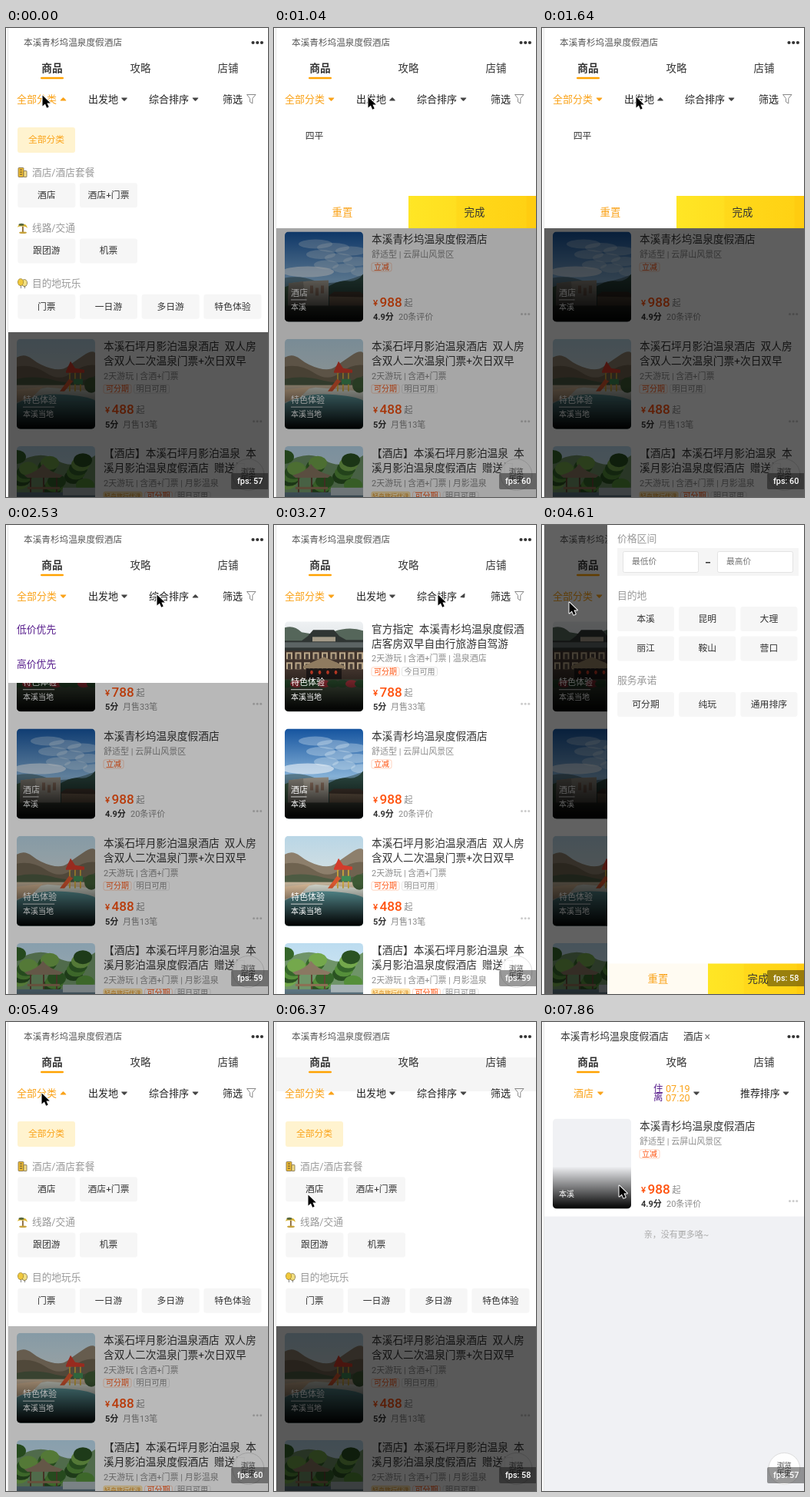
These frames come from a looping animation (341x609 px, 8000 ms). An HTML page with a canvas:

```html
<!DOCTYPE html>
<html lang="zh">
<head>
<meta charset="utf-8">
<title>酒店列表筛选</title>
<style>
  html, body { margin: 0; width: 100%; height: 100%; overflow: hidden; background: #fff; }
  canvas { display: block; width: 341px; height: 609px; }
</style>
</head>
<body>
<canvas id="stage"></canvas>
<script>
const W = 341, H = 609, LOOP = 8000, TICK = 148.3;
const FONT = 'Roboto, "Noto Sans CJK SC", "Noto Sans CJK", sans-serif';
const ORANGE = '#faa31a', PRICE = '#ff5310', PURPLE = '#551a8b', PALE = '#f0f1f4';
const HOTEL = '本溪青杉坞温泉度假酒店';

const canvas = document.getElementById('stage');
const ctx = canvas.getContext('2d');
const dpr = window.devicePixelRatio || 1;
canvas.width = Math.round(W * dpr);
canvas.height = Math.round(H * dpr);

// ---- helpers ----
function rect(x, y, w, h, color) {
  ctx.fillStyle = color;
  ctx.fillRect(x, y, w, h);
}

function round(x, y, w, h, r, fill, stroke) {
  ctx.beginPath();
  ctx.roundRect(x, y, w, h, r);
  if (fill) { ctx.fillStyle = fill; ctx.fill(); }
  if (stroke) { ctx.strokeStyle = stroke; ctx.lineWidth = 0.8; ctx.stroke(); }
}

function shape(color, d) {
  ctx.fillStyle = color;
  ctx.fill(new Path2D(d));
}

function oval(color, x, y, rx, ry = rx) {
  ctx.beginPath();
  ctx.ellipse(x, y, rx, ry, 0, 0, 7);
  ctx.fillStyle = color;
  ctx.fill();
}

// cy is the visual middle of the line
function text(s, x, cy, size, color, weight = 400, align = 'left') {
  ctx.font = `${weight} ${size}px ${FONT}`;
  ctx.textAlign = align;
  ctx.textBaseline = 'alphabetic';
  ctx.fillStyle = color;
  ctx.fillText(s, x, cy + size * 0.325);
}

const label = (s, x, cy, size, color, weight) => text(s, x, cy, size, color, weight, 'center');

function dots(x, y, gap, r, color) {
  for (let i = 0; i < 3; i++) oval(color, x + i * gap, y, r);
}

function arrow(x, y, angle, color) {
  ctx.save();
  ctx.translate(x, y);
  ctx.rotate(angle);
  shape(color, 'M-3.6 -2H3.6Q4.1 -1.7 3.5 -1.1L.7 1.9Q0 2.5 -.7 1.9L-3.5 -1.1Q-4.1 -1.7 -3.6 -2Z');
  ctx.restore();
}

function button(s, x, y, h = 32, w = 75, fill = '#f6f6f6', color = '#333') {
  round(x, y, w, h, 3, fill);
  label(s, x + w / 2, y + h / 2, 11.8, color);
}

function yellow(x, y, h) {
  const g = ctx.createLinearGradient(x, 0, W, 0);
  g.addColorStop(0, '#ffe625');
  g.addColorStop(0.37, '#ffdf20');
  g.addColorStop(0.38, '#ffd91b');
  g.addColorStop(0.92, '#ffd214');
  g.addColorStop(0.93, '#ffcc10');
  rect(x, y, W - x, h, g);
}

// ---- pictures, each 102 x 117 ----
function sky(top, bottom) {
  const g = ctx.createLinearGradient(0, 0, 0, 75);
  g.addColorStop(0, top);
  g.addColorStop(1, bottom);
  rect(0, 0, 102, 117, g);
}

function lodge() {
  sky('#eef1f3', '#c9d0d2');
  shape('#55665a', 'M0 8Q12 4 22 14L40 17L64 13Q84 6 102 12V50H0Z');
  shape('#2f3533', 'M30 19L37 11H64L71 19L80 24H102V40H0V25H22Z');
  shape('#5c6464', 'M0 27H102V34H0Z');
  rect(36, 20, 30, 6, '#a39a88');
  rect(0, 38, 102, 42, '#40332c');
  for (let y = 0; y < 2; y++) {
    for (let x = 0; x < 9; x++) {
      rect(2 + x * 11.5, 40 + y * 13, 8, 9, '#b9a688');
      rect(4 + x * 11.5, 42 + y * 13, 4, 7, '#4a3f38');
    }
  }
  shape('#8f7b60', 'M24 58L51 46L78 58V61H24Z');
  rect(28, 61, 46, 19, '#1d1817');
  for (let x = 0; x < 4; x++) oval('#c23a26', 35 + x * 10.5, 66, 1.8, 2.6);
  rect(0, 75, 102, 42, '#3f4a3a');
  for (let x = 0; x < 9; x++) oval(x % 3 === 1 ? '#9c3038' : '#28492b', 3 + x * 12, 81, 8, 5);
}

function stone() {
  sky('#15549f', '#9cc4e2');
  for (let i = 0; i < 9; i++) {
    oval('rgba(228,238,246,.32)', 40 + (i * 23) % 62, 16 + i * 4.5, 22 - i, 6);
  }
  oval('rgba(238,244,249,.6)', 30, 52, 34, 7);
  shape('#56788a', 'M0 60Q20 56 40 64T102 56V90H0Z');
  shape('#27413a', 'M52 74Q70 62 82 64T102 55V100H40Z');
  shape('#35503b', 'M0 72Q10 66 22 74V98H0Z');
  rect(58, 83, 44, 14, '#6b5a49');
  shape('#3d3129', 'M56 84L64 78H98L102 81V85Z');
  shape('#8f8a80', 'M5 67L30 64L57 63V98H4Z');
  shape('#76726a', 'M5 67L24 64.6L27 98H4Z');
  for (let i = 0; i < 3; i++) rect(33 + i * 7, 70 + (i % 2) * 3, 4, 10, '#7a6354');
  rect(0, 96, 102, 21, '#3a4036');
}

function pool() {
  sky('#b9d6e6', '#dfe3df');
  shape('#8d7f6c', 'M0 24Q10 18 20 26T44 38T66 36T86 22T102 18V70H0Z');
  shape('#6f6350', 'M0 36Q20 32 38 44T72 44T102 34V64H0Z');
  shape('#4d5b43', 'M0 52Q24 47 50 54T102 48V64H0Z');
  rect(0, 60, 102, 57, '#bfae96');
  shape('#cfd3c9', 'M0 70L40 63L102 68V90H0Z');
  shape('#5f9b9f', 'M0 84Q24 70 58 72T102 80V117H0Z');
  shape('#d2b594', 'M0 66L34 62L20 76L0 82Z');
  for (let i = 0; i < 3; i++) rect(68 + i * 7, 40, 1.8, 28, '#c9a33a');
  shape('#d23c2b', 'M64 42L70 29L76 38L88 40V44H64Z');
  shape('#d8562f', 'M68 52L56 68H62L73 55Z');
  rect(74, 52, 12, 7, '#3f8b55');
  oval('#3e5a35', 97, 60, 9, 10);
}

function garden() {
  sky('#bcdcf0', '#dcebf2');
  shape('#6f9468', 'M0 22Q30 4 52 18T102 12V60H0Z');
  for (let i = 0; i < 18; i++) {
    const x = (i * 37) % 108;
    const y = 14 + (i * 11) % 38 - Math.abs(x - 50) * 0.16;
    oval(['#35662a', '#558f3a', '#2a5222', '#74a84c'][i % 4], x, y + 8, 12, 9);
  }
  shape('#8a7862', 'M10 38Q28 33 34 23Q41 33 60 38L56 41H14Z');
  for (let i = 0; i < 3; i++) rect(17 + i * 17, 41, 2, 22, '#5f4634');
  rect(14, 53, 42, 3, '#8d7054');
  rect(0, 60, 102, 57, '#5c7480');
  rect(60, 54, 42, 10, '#a9b4b8');
}

// ---- hotel cards ----
const items = [
  { pic: lodge, title: ['官方指定 本溪青杉坞温泉度假酒', '店客房双早自由行旅游自驾游'],
    info: '2天游玩 | 含酒+门票 | 温泉酒店', tags: ['可分期', '今日可用'],
    price: '788', score: '5分', note: '月售33笔', kind: '特色体验', place: '本溪当地' },
  { pic: stone, title: [HOTEL], info: '舒适型 | 云屏山风景区', tags: ['立减'],
    price: '988', score: '4.9分', note: '20条评价', kind: '酒店', place: '本溪' },
  { pic: pool, title: ['本溪石坪月影泊温泉酒店 双人房', '含双人二次温泉门票+次日双早'],
    info: '2天游玩 | 含酒+门票', tags: ['可分期', '明日可用'],
    price: '488', score: '5分', note: '月售13笔', kind: '特色体验', place: '本溪当地' },
  { pic: garden, title: ['【酒店】本溪石坪月影泊温泉 本', '溪月影泊温泉度假酒店 赠送门'],
    info: '2天游玩 | 含酒+门票 | 月影温泉', tags: ['轻舟旅行优选', '可分期', '明日可用'],
    price: '588', score: '5分', note: '月售9笔', kind: '特色体验', place: '本溪当地' }
];
const result = { ...items[1], pic: null, kind: '' };

function thumb(it, y) {
  ctx.save();
  ctx.beginPath();
  ctx.roundRect(14, y, 102, 117, 5);
  ctx.clip();
  ctx.translate(14, y);
  if (it.pic) it.pic(); else rect(0, 0, 102, 117, PALE);
  const g = ctx.createLinearGradient(0, 62, 0, 117);
  g.addColorStop(0, 'rgba(0,0,0,0)');
  g.addColorStop(1, '#000');
  rect(0, 62, 102, 55, g);
  ctx.restore();
  if (it.kind) {
    text(it.kind, 22, y + 79.5, 11, '#fff');
    rect(22, y + 88, it.kind.length * 10.3, 0.9, '#ddd');
  }
  text(it.place, 22, y + 98, 10, '#fff');
}

function tagRow(tags, y) {
  let x = 127;
  for (const s of tags) {
    const special = s.length > 4, gray = s.length === 4;
    const size = special ? 8 : 10;
    const w = s.length * size + (special ? 2 : 6);
    const color = gray ? '#888' : special ? '#d98a16' : PRICE;
    round(x, y - 5.5, w, 11, 2, special ? '#ffe9b8' : null, gray ? '#ddd' : special ? '#ffd98a' : '#ffc9b0');
    label(s, x + w / 2, y + 0.3, size, color);
    x += w + 3.5;
  }
}

function card(it, y) {
  thumb(it, y);
  // an en space matches the wide gap between title parts
  it.title.forEach((s, i) => text(s.replace(' ', '\u2002'), 127, y + 9.8 + i * 19, 13.7, '#333'));
  const dy = y + it.title.length * 19;
  text(it.info, 127, dy + 10.5, 11, '#8c8c8c');
  tagRow(it.tags, dy + 27);
  text('¥', 129, y + 92.8, 11.5, PRICE, 500);
  text(it.price, 137.5, y + 92, 17.2, PRICE, 500);
  text('起', 169.5, y + 92.8, 11, '#888');
  text(it.score, 129, y + 111.3, 11, '#333', 700);
  text(it.note, it.score.length > 2 ? 162 : 152, y + 111.3, 11, '#8c8c8c');
  dots(322.5, y + 107, 4.6, 1.5, '#ccc');
}

// ---- header and filters ----
function tabs() {
  dots(321.5, 19, 5.7, 2.1, '#333');
  label('商品', 60, 53, 13.7, '#333', 700);
  label('攻略', 175, 53, 13.4, '#333');
  label('店铺', 289, 53, 13.4, '#333');
  round(45, 63.7, 30, 2.6, 1.3, '#ffa200');
}

function header(turn, band) {
  rect(3, 0, W, 108, '#fff');
  if (band) rect(3, 46, W, 44, '#f5f5f5');
  text(HOTEL, 23, 19, 11.65, '#555');
  tabs();
  text('全部分类', 14, 92.8, 13, ORANGE);
  text('出发地', 107, 92.8, 13, '#222');
  text('综合排序', 186, 92.8, 13, '#222');
  text('筛选', 282, 92.8, 13, '#222');
  [[74.5, ORANGE], [154, '#444'], [246.5, '#444']].forEach(([x, c], i) => arrow(x, 92.5, turn[i], c));
  ctx.strokeStyle = '#888';
  ctx.lineWidth = 1;
  ctx.stroke(new Path2D('M313.5 86.5H325L320.8 91.5V98L317.5 96V91.5Z'));
}

function resultHeader() {
  rect(3, 0, W, 108, '#fff');
  text(HOTEL, 24, 19, 12.8, '#333');
  text('酒店', 184, 19, 12.8, '#333');
  text('×', 211.5, 19, 14, '#777');
  tabs();
  text('酒店', 41, 92.8, 13, ORANGE);
  arrow(76, 92.5, 0, ORANGE);
  text('住', 145, 86.8, 12.5, PURPLE);
  text('离', 145, 98.3, 12.5, PURPLE);
  text('07.19', 161, 87.2, 12.6, ORANGE);
  text('07.20', 161, 98.7, 12.6, ORANGE);
  arrow(201, 92.5, 0, '#444');
  text('推荐排序', 258, 92.8, 12.9, '#222', 500);
  arrow(317.5, 92.5, 0, '#444');
}

// ---- drop-down panels ----
function hotelIcon(y) {
  round(16, y - 6, 7, 12, 1, '#eebb32', '#77684a');
  round(23, y - 2, 4, 8, 0.5, '#f4dc82', '#77684a');
  for (let i = 0; i < 3; i++) rect(18, y - 4 + i * 3, 3, 1.2, '#6b5a36');
}

function palmIcon(y) {
  rect(21, y - 2, 1.8, 8, '#8b6a38');
  shape('#d9b32b', `M15 ${y - 1}Q17 ${y - 7} 22 ${y - 4}Q26 ${y - 7} 28 ${y}Q24 ${y - 3} 22 ${y - 2}Q18 ${y - 3} 15 ${y - 1}Z`);
  oval('#58683d', 20, y - 4.5, 3.5, 1.5);
  oval('#c7a23b', 22, y + 6, 5, 1.2);
}

function balloonIcon(y) {
  rect(19, y, 0.9, 6, '#777');
  rect(24, y, 0.9, 6, '#777');
  oval('#837443', 24, y - 1, 4, 4.8);
  oval('#f2df83', 24, y - 1, 3.2, 4);
  oval('#a28a32', 19, y - 2, 4, 4.8);
  oval('#f0c83c', 19, y - 2, 3.2, 4);
}

const sections = [
  ['酒店/酒店套餐', hotelIcon, ['酒店', '酒店+门票']],
  ['线路/交通', palmIcon, ['跟团游', '机票']],
  ['目的地玩乐', balloonIcon, ['门票', '一日游', '多日游', '特色体验']]
];

function categoryPanel() {
  button('全部分类', 15, 129, 33, 75, '#fff3cf', ORANGE);
  sections.forEach(([name, icon, list], i) => {
    const y = 187.5 + i * 72.3;
    icon(y);
    text(name, 34, y, 12.7, '#999');
    list.forEach((s, j) => button(s, 15.3 + j * 80.7, y + 13.7));
  });
}

function cityPanel() {
  label('四平', 52.5, 140.4, 11.8, '#333');
  label('重置', 89, 239.3, 13.4, ORANGE);
  yellow(175, 218, 42);
  label('完成', 261, 239.3, 13.4, '#333');
}

function sortPanel() {
  text('低价优先', 14, 135.5, 12.8, PURPLE);
  text('高价优先', 14, 181, 12.8, PURPLE);
}

const panels = [
  { bottom: 395, draw: categoryPanel, spans: [[-9, 2], [37, 44]] },
  { bottom: 260, draw: cityPanel, spans: [[6, 13]] },
  { bottom: 205, draw: sortPanel, spans: [[17, 22]] }
];

// Arrow flips at once on opening and swings back over two steps
function arrowTurn(panel, k) {
  for (const [from, to] of panel.spans) {
    if (k >= from && k < to) return Math.PI;
    if (k === to) return -0.7;
  }
  return 0;
}

// ---- side drawer ----
function drawer(x) {
  ctx.save();
  ctx.translate(x - 85, 0);
  rect(85, 0, 256, H, '#fff');
  const head = (s, y) => text(s, 98, y, 12.8, '#999');
  const row = (list, y) => list.forEach((s, i) => button(s, 98 + i * 80.2, y, 32, 74));
  head('价格区间', 18);
  rect(98, 30, 236, 36, '#f5f5f5');
  round(105.5, 34.5, 98, 27, 2, '#fff', '#ddd');
  round(228.5, 34.5, 98, 27, 2, '#fff', '#ddd');
  text('最低价', 117, 48, 10.7, '#757575');
  text('最高价', 240, 48, 10.7, '#757575');
  rect(213, 48, 6, 1.5, '#333');
  head('目的地', 92);
  row(['本溪', '昆明', '大理'], 106);
  row(['丽江', '鞍山', '营口'], 144.5);
  head('服务承诺', 202);
  row(['可分期', '纯玩', '通用排序'], 217);
  rect(85, 569.5, 131, 40, '#fffbf2');
  yellow(216, 569.5, 40);
  label('重置', 151, 590, 13.4, ORANGE);
  label('完成', 281, 590, 13.4, '#333');
  ctx.restore();
}

// ---- motion, in steps of TICK ----
const ramp = (k, a, b) => Math.min(1, Math.max(0, (k - a) / (b - a)));
const easeOut = p => 1 - (1 - p) ** 2;

function drawerOpen(k) {
  if (k < 25 || k >= 35) return 0;
  return k < 33 ? easeOut(ramp(k, 24, 28)) : 1 - easeOut(ramp(k, 32, 35));
}

const cursorPath = [
  [0, 47, 87], [2, 47, 87], [4, 122, 89], [13, 122, 89], [15, 196, 90], [20, 196, 90],
  [22, 213, 90], [25, 300, 93], [29, 300, 93], [31, 35, 100], [33, 35, 100], [35, 46, 92],
  [39, 46, 92], [42, 44, 224], [46, 44, 224], [51, 100, 212], [54, 100, 212]
];

function cursorAt(k) {
  const i = Math.max(1, cursorPath.findIndex(p => p[0] >= k));
  const [a, x0, y0] = cursorPath[i - 1], [b, x1, y1] = cursorPath[i];
  const p = ramp(k, a, b);
  return [x0 + (x1 - x0) * p, y0 + (y1 - y0) * p];
}

const fpsSteps = [[0, 57], [3, 59], [6, 60], [14, 58], [17, 59], [26, 60], [28, 57], [31, 58],
  [34, 60], [38, 59], [43, 58], [46, 60], [48, 59], [51, 58], [53, 57]];
const fpsAt = k => fpsSteps.filter(s => s[0] <= k).pop()[1];

function historyButton() {
  ctx.beginPath();
  ctx.arc(315.3, 580, 20.5, 0, 7);
  ctx.fillStyle = 'rgba(255,255,255,.94)';
  ctx.fill();
  ctx.strokeStyle = '#ddd';
  ctx.lineWidth = 1;
  ctx.stroke();
  label('浏览', 315.3, 575.5, 9.5, '#444');
  label('历史', 315.3, 585.5, 9.5, '#444');
}

function pointer([x, y]) {
  ctx.save();
  ctx.translate(x, y);
  const p = new Path2D('M.5 .5V14.5L3.9 11.4L6.2 16.7L8.7 15.6L6.4 10.5H10.8Z');
  ctx.lineJoin = 'round';
  ctx.strokeStyle = '#fff';
  ctx.lineWidth = 2;
  ctx.stroke(p);
  ctx.fillStyle = '#000';
  ctx.fill(p);
  ctx.restore();
}

function listPage(k) {
  items.forEach((it, i) => card(it, 125.3 + i * 139.2));
  historyButton();
  for (const panel of panels) {
    const span = panel.spans.find(([a, b]) => k >= a && k < b);
    if (!span) continue;
    const dim = Math.min(0.65, 0.28 + 0.07 * (k - span[0]));
    rect(3, 108, W, H, `rgba(0,0,0,${dim})`);
    rect(3, 108, W, panel.bottom - 108, '#fff');
    panel.draw();
  }
  header(panels.map(p => arrowTurn(p, k)), k >= 38 && k < 44);
  const open = drawerOpen(k);
  if (open) {
    rect(3, 0, W, H, `rgba(0,0,0,${0.62 * open})`);
    drawer(W - 256 * open);
  }
}

function resultPage(k) {
  rect(3, 108, W, H, PALE);
  if (k >= 53) {
    rect(3, 108, W, 144.5, '#fff');
    card(result, 125.5);
    label('亲，没有更多咯~', 175, 276, 11, '#aaa');
  }
  historyButton();
  resultHeader();
}

function draw(t) {
  const k = Math.min(53, Math.floor((t + 16) / TICK));
  ctx.setTransform(dpr, 0, 0, dpr, 0, 0);
  rect(0, 0, W, H, '#fff');
  if (k < 52) listPage(k); else resultPage(k);
  rect(0, 0, 2, H, '#fff');
  rect(2, 0, 1, H, '#e4e4e4');
  round(293, 578, 50, 21, 2, 'rgba(0,0,0,.4)');
  text('fps: ' + fpsAt(k), 301, 588.8, 10.8, '#fff', 500);
  pointer(cursorAt(k));
}

const start = performance.now();
function loop() {
  draw((performance.now() - start) % LOOP);
  requestAnimationFrame(loop);
}
loop();
</script>
</body>
</html>
```
